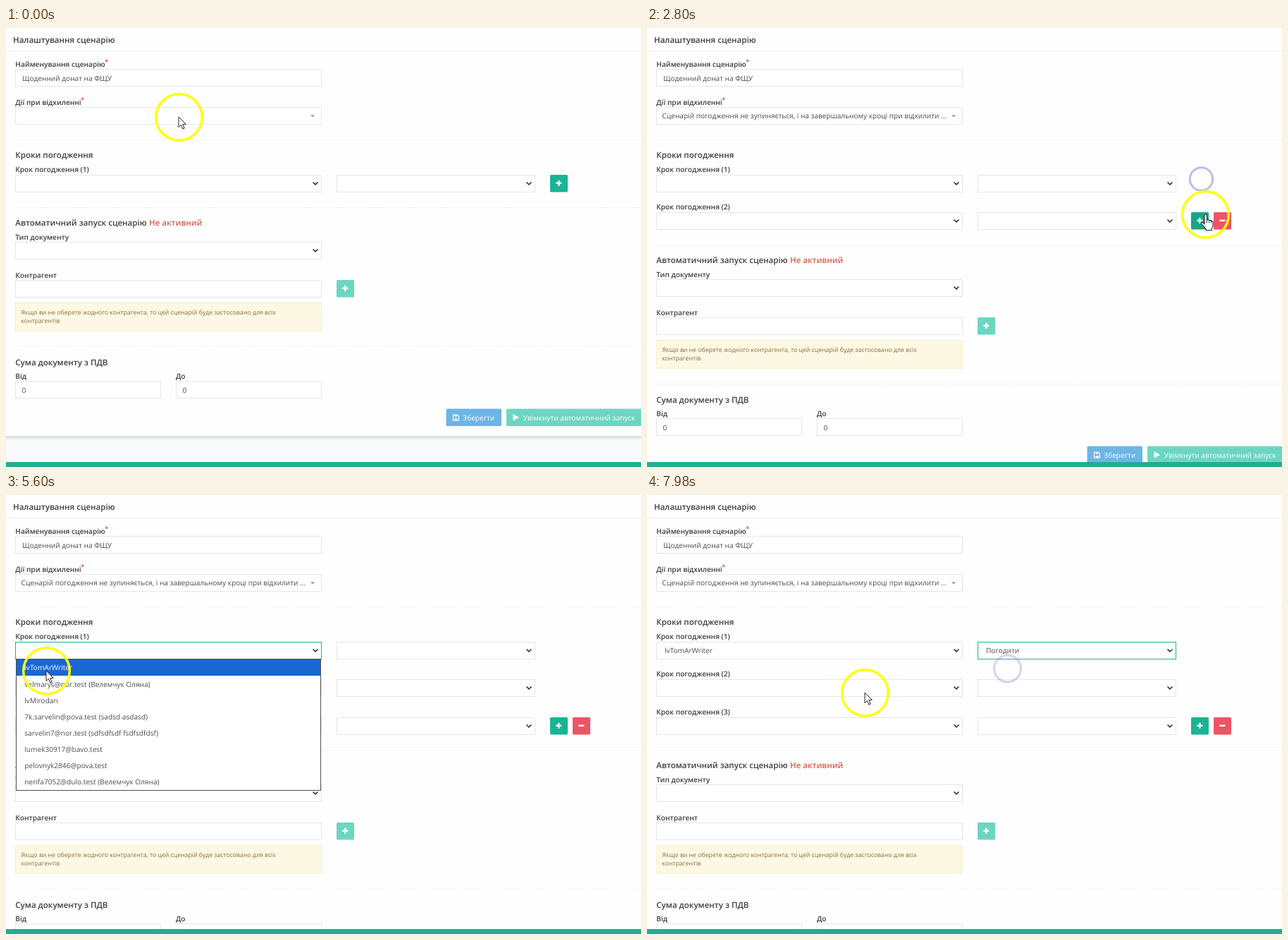
Recreate the animation shown at these times as an HTML page with a canvas. Size 901x622 px, loop 8 s.

```html
<!DOCTYPE html>
<html lang="uk">
<head>
<meta charset="utf-8">
<title>Налаштування сценарію</title>
<style>
html, body { margin: 0; width: 100%; height: 100%; overflow: hidden; background: #fefefe; }
canvas { display: block; }
</style>
</head>
<body>
<canvas id="stage" width="901" height="622"></canvas>
<script>
const ctx = document.getElementById('stage').getContext('2d');
const LOOP = 8000, STEP = 140, ROW = 53.4;
const GREEN = '#1ab394', PALE = '#6dd6c3', RED = '#ec5565', LINE = '#e5e6e7', DARK = '#3e3e3e', TEXT = '#4c4c4c';

const USER = 'lvTomArWriter';
const users = [USER, 'velmarys@nor.test (Велемчук Оляна)', 'lvMirodan', '7k.sarvelin@pova.test (sadsd asdasd)',
  'sarvelin7@nor.test (sdfsdfsdf fsdfsdfdsf)', 'lumek30917@bavo.test', 'pelovnyk2846@pova.test',
  'nerifa7052@dulo.test (Велемчук Оляна)'];
const ACTION = 'Сценарій погодження не зупиняється, і на завершальному кроці при відхилити ...';

// Pointer stops: time, x, y
const path = [[0, 245, 126], [560, 245, 126], [1260, 218, 232], [1400, 218, 234], [1680, 584, 245],
  [2240, 786, 214], [2380, 786, 214], [2800, 792, 264], [3080, 791, 273], [3500, 791, 273],
  [4060, 432, 221], [4480, 300, 222], [4620, 300, 222], [5460, 57, 249], [5600, 57, 249],
  [5740, 57, 246], [6440, 522, 222], [6580, 522, 222], [7000, 513, 251], [7280, 511, 246],
  [7420, 511, 246], [7980, 309, 280]];
// Clicks: time, x, y
const clicks = [[500, 245, 126], [1480, 218, 234], [2450, 786, 214], [3480, 791, 273],
  [4560, 300, 222], [5740, 57, 246], [6650, 522, 222], [7400, 511, 246]];

function pointer(t) {
  const i = path.findIndex(p => p[0] > t);
  if (i < 0) return path[path.length - 1].slice(1);
  const [t0, x0, y0] = path[i - 1], [t1, x1, y1] = path[i];
  const u = (t - t0) / (t1 - t0), k = u * u * (3 - 2 * u);
  return [x0 + (x1 - x0) * k, y0 + (y1 - y0) * k];
}

// Text centred on its capitals at height y
function text(s, x, y, color = TEXT, size = 10.12, weight = 400) {
  ctx.font = `${weight} ${size}px "Open Sans", sans-serif`;
  ctx.fillStyle = color;
  ctx.fillText(s, x, y + size * 0.36);
}
const label = (s, x, y) => text(s, x, y, DARK, 10.15, 600);
const heading = (s, x, y, color = DARK) => text(s, x, y, color, 11.56, 600);
const note = (s, y) => text(s, 21.5, y, '#8a6d3b', 8.71);
const star = (x, y) => text('*', x, y, '#e23b3b', 9, 600);

function rect(x, y, w, h, color) {
  ctx.fillStyle = color;
  ctx.fillRect(x, y, w, h);
}

function box(x, y, w, h, border = LINE, fill = '#fff') {
  rect(x, y, w, h, fill);
  ctx.strokeStyle = border;
  ctx.lineWidth = 1;
  ctx.strokeRect(x + 0.5, y + 0.5, w - 1, h - 1);
}

function shape(points, fill, stroke, width = 1, close = true) {
  ctx.beginPath();
  points.forEach(([x, y]) => ctx.lineTo(x, y));
  if (close) ctx.closePath();
  if (fill) { ctx.fillStyle = fill; ctx.fill(); }
  if (stroke) { ctx.strokeStyle = stroke; ctx.lineWidth = width; ctx.stroke(); }
}

function circle(x, y, r, color, width) {
  ctx.beginPath();
  ctx.arc(x, y, r, 0, 7);
  ctx.strokeStyle = color;
  ctx.lineWidth = width;
  ctx.stroke();
}

function select(x, y, w, value = '', focus = false) {
  box(x, y, w, 25, focus ? GREEN : LINE);
  text(value, x + 12, y + 12.5);
  const cx = x + w - 9;
  shape([[cx - 3.5, y + 10.5], [cx, y + 13.8], [cx + 3.5, y + 10.5]], null, '#333', 1.7, false);
}

function button(x, y, w, color) {
  ctx.fillStyle = color;
  ctx.beginPath();
  ctx.roundRect(x, y, w, 24.5, 1.5);
  ctx.fill();
}

function signButton(x, y, color, plus) {
  button(x, y, 25, color);
  rect(x + 8.3, y + 10.6, 8, 2.4, '#fff');
  if (plus) rect(x + 11.1, y + 7.8, 2.4, 8, '#fff');
}

function divider(y) {
  ctx.setLineDash([2, 1.5]);
  shape([[13, y + 0.5], [901, y + 0.5]], null, '#eceeef', 1, false);
  ctx.setLineDash([]);
}

function list(x, y, w, items) {
  box(x, y, w, Math.round(items.length * 23.1 + 2.4), '#505050');
  rect(x + 1, y + 1, w - 2, 23, '#1967d2');
  items.forEach((s, i) => text(s, x + 12.3, y + 12.8 + i * 23.1, i ? TEXT : '#fff'));
}

function actionList(y) {
  box(13, 136, 435, 111, '#aaa');
  box(18, 141, 425, 22, '#aaa');
  const second = y > 206;
  rect(14, second ? 206 : 166, 433, 40, GREEN);
  const tone = on => on ? '#fff' : TEXT;
  text('Сценарій погодження зупиняється, якщо на одному з кроків', 22, 178, tone(!second));
  text('документ відхилено', 22, 193, tone(!second));
  text('Сценарій погодження не зупиняється, і на завершальному кроці', 22, 218, tone(second));
  text('при відхилити документ', 22, 233, tone(second));
}

function saveIcon(x, y) {
  shape([[x, y], [x + 6, y], [x + 8, y + 2], [x + 8, y + 8], [x, y + 8]], null, '#fff', 1.2);
  rect(x + 2, y, 3.5, 2.6, '#fff');
  rect(x + 2, y + 5, 4, 3, '#fff');
}

function arrow(x, y) {
  shape([[0, 0], [0, 14.5], [3.4, 11.4], [5.8, 17], [8.2, 16], [5.8, 10.6], [10.3, 10.3]]
    .map(([a, b]) => [x + a, y + b]), '#fff', '#222');
}

function hand(x, y) {
  const outline = new Path2D('M0 2Q0 0 1.7 0T3.4 2V8Q5.5 6.8 6.7 8.5Q8.7 7.7 9.6 9.4Q12 9 12 11.5V16Q12 18.5 10.3 20V22.5H1.8V20.5L-4.3 13.5Q-5 11.2-2.8 11.2L0 13.5Z');
  ctx.save();
  ctx.translate(x - 1, y);
  ctx.fillStyle = '#fff';
  ctx.fill(outline);
  ctx.strokeStyle = '#222';
  ctx.lineWidth = 1.1;
  ctx.stroke(outline);
  for (const fx of [3.4, 6.7, 9.6]) shape([[fx, 8.5], [fx, 12]], null, '#222', 1, false);
  ctx.restore();
}

function topForm(t) {
  heading('Налаштування сценарію', 10, 16.5);
  rect(0, 32, 901, 1, '#eceeef');
  label('Найменування сценарію', 13.3, 51);
  star(140.3, 47.5);
  box(13, 58, 435, 25);
  text('Щоденний донат на ФЩУ', 23, 71);
  label('Дії при відхиленні', 13.3, 105);
  star(106.3, 101.5);
  box(13, 112, 435, 25, t >= 560 && t < 2520 ? GREEN : LINE);
  if (t >= 1540) text(ACTION, 21.5, 124.5);
  shape([[432, 123.3], [438, 123.3], [435, 126.5]], '#999');
  divider(158);
}

function steps(t, rows, hover) {
  heading('Кроки погодження', 13.3, 180);
  for (let i = 0; i < rows; i++) {
    const y = 208 + Math.round(ROW * i);
    const first = i === 0;
    label(`Крок погодження (${i + 1})`, 13.3, y - 7.5);
    select(13, y, 435, first && t >= 5880 ? USER : '', first && t >= 4620 && t < 6720);
    select(469, y, 282, first && t >= 7420 ? 'Погодити' : '', first && t >= 6720);
    if (i === rows - 1) {
      signButton(772, y, hover ? '#18a689' : GREEN, true);
      if (i) signButton(804, y, RED, false);
    }
  }
}

function lowerForm() {
  divider(254);
  heading('Автоматичний запуск сценарію', 13.3, 276);
  heading('Не активний', 203, 276, '#d3604f');
  label('Тип документу', 13.3, 296);
  select(13, 303, 435);
  label('Контрагент', 13.3, 350);
  box(13, 357, 435, 25);
  signButton(469, 357, PALE, true);
  box(13, 389, 435, 40.5, '#f8eecb', '#fcf8e3');
  note('Якщо ви не оберете жодного контрагента, то цей сценарій буде застосовано для всіх', 403);
  note('контрагентів', 415);
  divider(451);
  heading('Сума документу з ПДВ', 13.3, 473.5);
  label('Від', 13.3, 493.5);
  label('До', 241, 493.5);
  box(13, 500, 207, 25);
  box(241, 500, 207, 25);
  text('0', 22.5, 513);
  text('0', 250.5, 513);
  button(624.5, 539.5, 78.5, '#6cb5e4');
  saveIcon(634.5, 548);
  text('Зберегти', 648.3, 552, '#fff');
  button(710, 539.5, 200, PALE);
  shape([[719.5, 547], [728, 551.7], [719.5, 556.4]], '#fff');
  text('Увімкнути автоматичний запуск', 733.8, 552, '#fff');

  rect(0, 579, 901, 60, '#f9fafc');
  const shade = ctx.createLinearGradient(0, 578, 0, 584);
  shade.addColorStop(0, '#d3d5d8');
  shade.addColorStop(1, '#f9fafc');
  rect(0, 578, 901, 6, shade);
}

function draw(t) {
  const [x, y] = pointer(t);
  const rows = t < 2520 ? 1 : t < 3500 ? 2 : 3;
  const onButton = t >= 2240 && t <= 3500;
  ctx.textRendering = 'geometricPrecision';
  rect(0, 0, 901, 622, '#fefefe');
  topForm(t);
  steps(t, rows, onButton);
  ctx.save();
  ctx.translate(0, Math.round(ROW * (rows - 1)));
  lowerForm();
  ctx.restore();
  rect(0, 615, 901, 7, '#22ad91');

  if (t >= 560 && t < 1540) actionList(y);
  if (t >= 4620 && t < 5880) list(14, 232, 433, users);
  if (t >= 6720 && t < 7420) list(468, 232, 282, ['Погодити', 'Підписати']);

  for (const [at, cx, cy] of clicks) {
    const age = t - at;
    if (age >= 0 && age < 750) circle(cx + 0.5, cy, 12 + age * 0.012, `rgba(122,135,203,${0.8 - age * 0.00078})`, 3);
  }
  const pressed = t >= 6930 && t < 7400;
  if (!pressed) circle(x + 0.5, y + 0.4, 32.8, '#ffff0c', 3.5);
  (onButton ? hand : arrow)(x, y);
}

function tick(now) {
  draw(Math.floor(now % LOOP / STEP) * STEP);
  requestAnimationFrame(tick);
}
requestAnimationFrame(tick);
</script>
</body>
</html>
```
